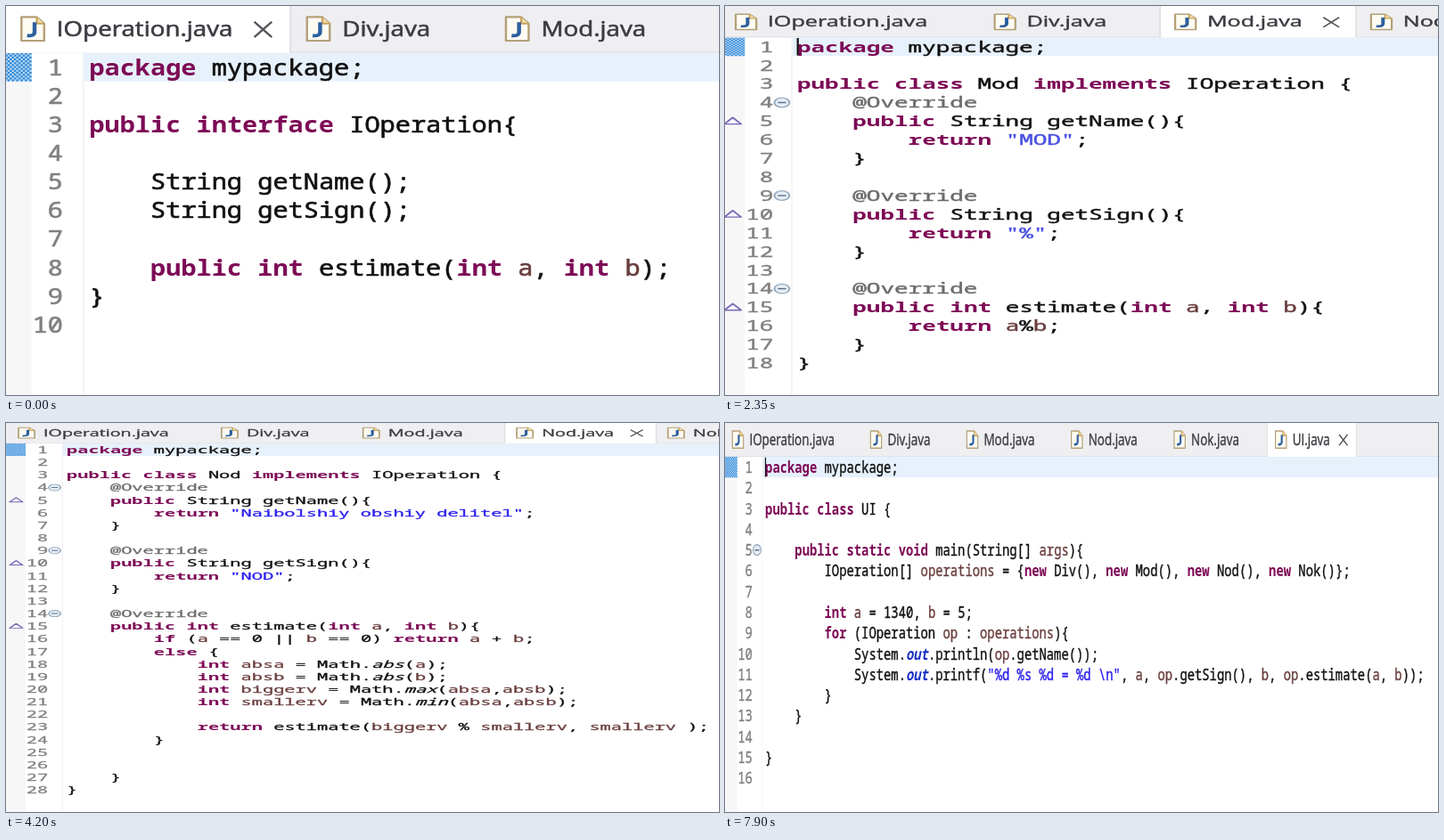
Recreate the animation shown at these times as an HTML page with a canvas. Size 800 by 437 pixels, loop 8000 ms.

```html
<!DOCTYPE html>
<html lang="en">
<head>
<meta charset="utf-8">
<title>Java editor tabs</title>
<style>
  html, body { margin: 0; width: 100%; height: 100%; overflow: hidden; background: #fff; }
  canvas { display: block; filter: blur(0.45px); }
</style>
</head>
<body>
<canvas id="stage" width="800" height="437"></canvas>
<script>
const ctx = document.getElementById('stage').getContext('2d');
const LOOP = 8000;

// Editor metrics in unscaled pixels; x = 0 is the first code column, y = 0 the top of line 1.
const CHAR = 7, LINE = 15, BASE = 11.7;
const MONO = '11.667px "Noto Sans Mono", "DejaVu Sans Mono", monospace';
const SANS = '11.3px "Open Sans", "Noto Sans", sans-serif';
const TABS = ['IOperation', 'Div', 'Mod', 'Nod', 'Nok', 'UI'];
const TAB_X = [0, 130.6, 221.6, 320.4, 417.6, 513.3, 597.6].map(x => x - 14.9);

const KEYWORDS = new Set(('package public interface class implements int return ' +
  'if else while for new static void').split(' '));
const LOCALS = new Set('a b absa absb biggerv smallerv nok op operations args'.split(' '));

const iface = String.raw`package mypackage;

public interface IOperation{

    String getName();
    String getSign();

    public int estimate(int a, int b);
}
`;

const method = (head, body) => `    @Override
    public ${head}{
${body}
    }`;

function operation(name, title, sign, body, gap, tail) {
  return `package mypackage;

public class ${name} implements IOperation {
${gap}${method('String getName()', `        return "${title}";`)}

${method('String getSign()', `        return "${sign}";`)}

${method('int estimate(int a, int b)', body)}
${tail}`;
}

const absolutes = `        else {
            int absa = Math.abs(a);
            int absb = Math.abs(b);
            int biggerv = Math.max(absa,absb);
            int smallerv = Math.min(absa,absb);
`;

const nodBody = `        if (a == 0 || b == 0) return a + b;
${absolutes}
            return estimate(biggerv % smallerv, smallerv );
        }

`;

const nokBody = `        if (a == 0 || b == 0) return 0;
${absolutes}            int nok = biggerv;
            while (nok % smallerv !=0) nok+=biggerv;
            return nok;
        }`;

const ui = String.raw`package mypackage;

public class UI {

    public static void main(String[] args){
        IOperation[] operations = {new Div(), new Mod(), new Nod(), new Nok()};

        int a = 1340, b = 5;
        for (IOperation op : operations){
            System.out.println(op.getName());
            System.out.printf("%d %s %d = %d \n", a, op.getSign(), b, op.estimate(a, b));
        }
    }

}
`;

const slides = [
  { at: 0, x: 93.4, y: 52.5, sx: 2.453, sy: 2.143, code: iface },
  { at: 500, x: 85.2, y: 32.2, sx: 2.243, sy: 1.28, str: '#3457c4',
    code: operation('Div', 'DIV', '/', '        return a/b;', '\n', '\n}\n') },
  { at: 2350, x: 81, y: 35.3, sx: 2.225, sy: 1.394, str: '#4a52e0', caret: true,
    code: operation('Mod', 'MOD', '%', '        return a%b;', '', '}') },
  { at: 4200, x: 68.1, y: 22.9, sx: 1.745, sy: 0.944,
    code: operation('Nod', 'Naibolshiy obshiy delitel', 'NOD', nodBody, '', '}') },
  { at: 6050, x: 68.7, y: 25.5, sx: 1.85, sy: 0.964, caret: true,
    code: operation('Nok', 'Naimenshee obshee kratnoe', 'NOK', nokBody, '', '}\n') },
  { at: 7900, x: 45.1, y: 38, sx: 1.187, sy: 1.551, caret: true, code: ui }
];

function rect(x, y, w, h, color) {
  ctx.fillStyle = color;
  ctx.fillRect(x, y, w, h);
}

// A hairline outline gives regular text the firmer stems of screen type.
function text(str, x, y, font, color, align = 'left') {
  ctx.font = font;
  ctx.fillStyle = ctx.strokeStyle = color;
  ctx.textAlign = align;
  ctx.fillText(str, x, y);
  if (font.includes('bold')) return;
  ctx.lineWidth = 0.28;
  ctx.lineJoin = 'round';
  ctx.strokeText(str, x, y);
}

function path(points, stroke, width, fill, closed) {
  ctx.beginPath();
  points.forEach(([x, y]) => ctx.lineTo(x, y));
  if (closed) ctx.closePath();
  if (fill) { ctx.fillStyle = fill; ctx.fill(); }
  ctx.strokeStyle = stroke;
  ctx.lineWidth = width;
  ctx.stroke();
}

function fileIcon(x) {
  path([[x, -18.7], [x + 7, -18.7], [x + 10.4, -15.3], [x + 10.4, -6.3], [x, -6.3]],
    '#b5a078', 1, '#fdfbf2', true);
  path([[x + 7, -18.7], [x + 7, -15.3], [x + 10.4, -15.3]], '#c9a45c', 0.9, '#f0dca8');
  ctx.beginPath();
  ctx.moveTo(x + 6, -16);
  ctx.lineTo(x + 6, -11);
  ctx.quadraticCurveTo(x + 6, -8.6, x + 2.6, -9);
  ctx.strokeStyle = '#2c5f9e';
  ctx.lineWidth = 1.8;
  ctx.stroke();
}

function drawTabs(active, left, right) {
  rect(left, -40, right - left, 40, '#efeff2');
  rect(left, -0.7, right - left, 0.7, '#dfe1e6');
  const from = TAB_X[active] - 23.7, to = TAB_X[active + 1] - 23.7;
  rect(from, -40, to - from, 40, '#fff');
  rect(from - 0.3, -40, 0.6, 40, '#d9dade');
  rect(to - 0.3, -40, 0.6, 40, '#d9dade');
  TABS.forEach((name, i) => {
    fileIcon(TAB_X[i] - 16.1);
    text(name + '.java', TAB_X[i], -8.6, SANS, '#3b3b42');
  });
  const cx = to - 12.5, cy = -12.2;
  path([[cx - 4, cy - 4], [cx + 4, cy + 4]], '#505056', 1);
  path([[cx - 4, cy + 4], [cx + 4, cy - 4]], '#505056', 1);
}

function style(token, before, strColor) {
  if (token[0] === '"') return ['', strColor];
  if (token[0] === '@') return ['', '#6c6c6c'];
  if (KEYWORDS.has(token)) return ['bold ', '#7d0a56'];
  if (before.endsWith('Math.')) return ['italic ', '#111'];
  if (token === 'out') return ['italic bold ', '#1a2fc4'];
  return ['', LOCALS.has(token) ? '#6a3e3e' : '#111'];
}

function drawCode(line, y, strColor) {
  for (const m of line.matchAll(/"[^"]*"|@?\w+|[^\s\w"@]+/g)) {
    const [face, color] = style(m[0], line.slice(0, m.index), strColor);
    text(m[0], m.index * CHAR, y, face + MONO, color);
  }
}

function foldMark(y) {
  ctx.beginPath();
  ctx.arc(-7.7, y, 3.8, 0, Math.PI * 2);
  ctx.fillStyle = '#e6edf4';
  ctx.fill();
  ctx.strokeStyle = '#93a9bd';
  ctx.lineWidth = 0.9;
  ctx.stroke();
  path([[-9.8, y], [-5.6, y]], '#58718c', 1);
}

function overrideMark(y) {
  path([[-36.7, y + 2.3], [-32.5, y - 3], [-28.3, y + 2.3]], '#7568b4', 1, '#f6f4fc', true);
}

function rangeMark(left) {
  rect(left, 0, -26.4 - left, LINE, '#b4d5f2');
  for (let r = 0; r < LINE; r++) {
    for (let x = -27.4 - r % 2; x > left - 1; x -= 2) rect(x, r, 1, 1, '#2f88d8');
  }
}

function draw(slide, index) {
  const { x, y, sx, sy, code, caret, str = '#2a1fee' } = slide;
  ctx.setTransform(1, 0, 0, 1, 0, 0);
  rect(0, 0, 800, 437, '#fff');
  ctx.setTransform(sx, 0, 0, sy, x, y);
  const left = -x / sx, right = (800 - x) / sx;

  rect(left, 0, -26.4 - left, 437 / sy, '#f7f7f8');
  rect(-3, 0, 0.6, 437 / sy, '#f0f0f2');
  rect(-2.4, 0, right + 2.4, LINE, '#e7f1fc');
  rangeMark(left);
  drawTabs(index, left, right);

  const lines = code.split('\n');
  lines.forEach((line, i) => {
    const top = i * LINE, mid = top + LINE / 2;
    text(String(i + 1), -12, top + BASE, MONO, '#808080', 'right');
    if (/@Override| main\(/.test(line)) foldMark(mid);
    if (i && lines[i - 1].includes('@Override')) overrideMark(mid);
    drawCode(line, top + BASE, str);
  });
  if (caret) rect(-0.2, 0.5, 1, LINE - 1, '#111');
}

function frame(now) {
  const t = now % LOOP;
  const index = Math.max(0, slides.findLastIndex(s => s.at <= t));
  draw(slides[index], index);
  requestAnimationFrame(frame);
}
frame(performance.now());
</script>
</body>
</html>
```
